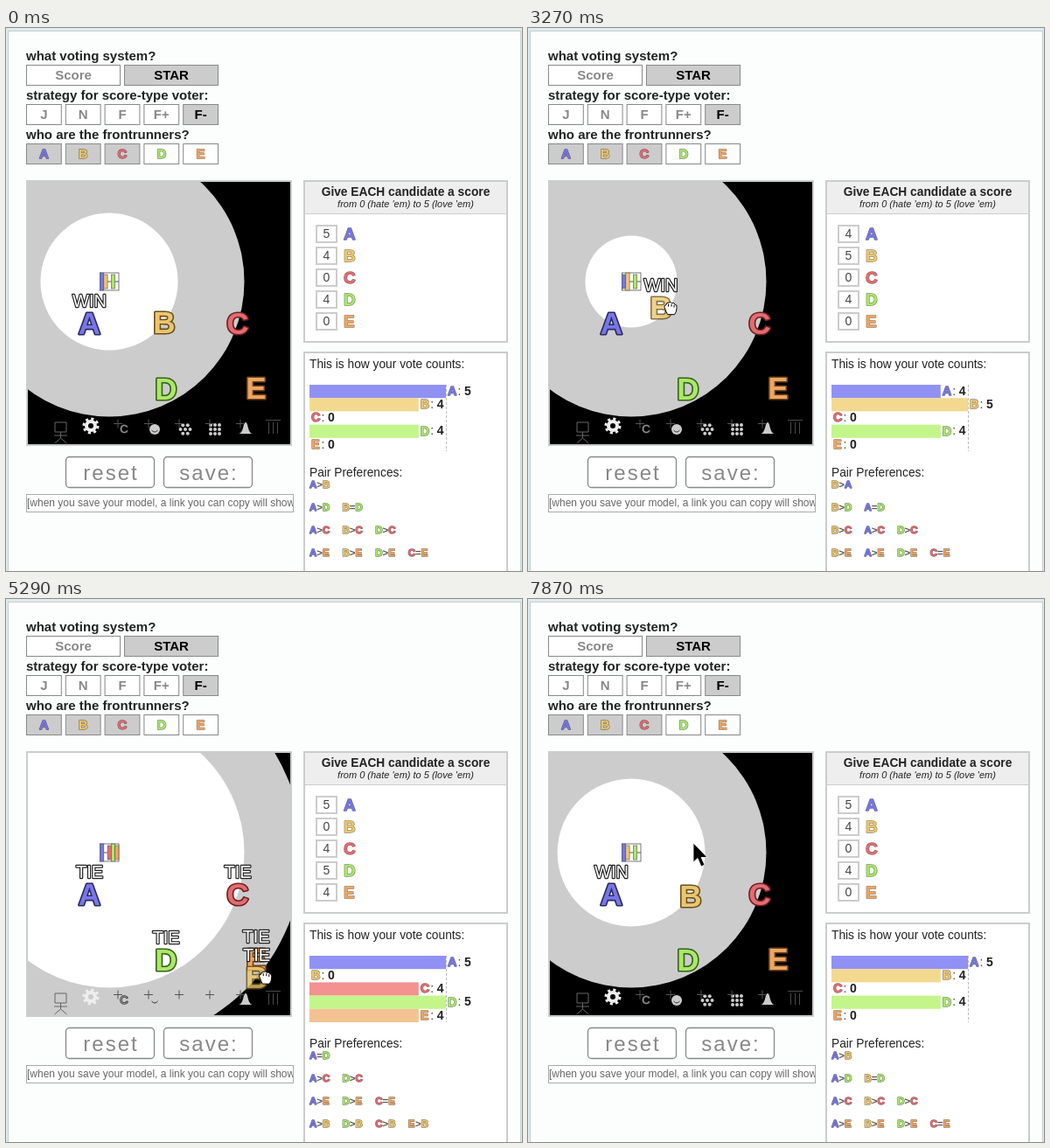
An HTML page for the animation above (7.99 s loop, 590 px wide and 621 px high).

```html
<!DOCTYPE html>
<html lang="en">
<head>
<meta charset="utf-8">
<title>Voting sandbox</title>
<style>
html, body { margin: 0; width: 100%; height: 100%; overflow: hidden; background: #dfeaec; }
svg { display: block; font-family: "Liberation Sans", Arial, sans-serif; }
</style>
</head>
<body>
<svg id="stage" width="590" height="621" viewBox="0 0 590 621"></svg>
<script>
const LOOP = 7990, STEP = 120;
const ENTER = 500, GRAB = 1760, DROP = 7100, OPEN = 7720, LEAVE = 7870;
const VOTER = { x: 118, y: 290 };
const CANDIDATES = [
  { id: 'A', x: 95.5, y: 337.5, fill: '#7676e6', dark: '#29295f', bar: '#9191f4' },
  { id: 'B', x: 181, y: 337, fill: '#ecc66e', dark: '#67501c', bar: '#f3d990' },
  { id: 'C', x: 265, y: 337.5, fill: '#e46c70', dark: '#6b2024', bar: '#f39191' },
  { id: 'D', x: 183, y: 413, fill: '#aae868', dark: '#366018', bar: '#c3f58b' },
  { id: 'E', x: 286, y: 411.5, fill: '#eda662', dark: '#6d4118', bar: '#f4c290' },
];

// Drag of B: first redraw, number of redraws, where it ends
const MOVES = [[1760, 6, 175, 330], [2480, 1, 156, 322], [2600, 2, 146, 312], [3150, 2, 152, 320],
  [3420, 4, 185, 346.5], [4550, 3, 228, 398], [4910, 4, 286.5, 433], [5410, 2, 294, 440],
  [5780, 4, 218, 381], [6260, 2, 192, 350], [6530, 1, 179, 333], [6670, 1, 177, 331], [7100, 1, 186, 340]];

const series = (start, n, gap) => Array.from({ length: n }, (_, i) => start + i * gap);
const TICKS = [0, ...series(ENTER, 9, 140), ...MOVES.flatMap(([t, n]) => series(t, n, STEP)), OPEN, LEAVE];

function dragged(t) {
  let { x, y } = CANDIDATES[1];
  for (const [start, n, toX, toY] of MOVES) {
    const k = Math.min(1, Math.max(0, (t - start + STEP) / (n * STEP)));
    x += (toX - x) * k;
    y += (toY - y) * k;
  }
  return { x, y };
}

// The arrow curves in from the lower left to B
function approach(t) {
  const s = ((t - ENTER) / (GRAB - ENTER)) ** 0.8;
  const curve = (a, b, c) => (1 - s) ** 2 * a + 2 * s * (1 - s) * b + s * s * c;
  return { x: curve(57, 390, 190), y: curve(597, 400, 336) };
}

// y is the middle of the capitals
const text = (s, x, y, size, attrs = '') =>
  `<text x="${x}" y="${y + size * 0.344}" font-size="${size}" ${attrs}>${s}</text>`;
const rect = (x, y, w, h, fill, attrs = '') =>
  `<rect x="${x}" y="${y}" width="${w}" height="${h}" fill="${fill}" ${attrs}/>`;
const disc = (x, y, r, fill) => `<circle cx="${x}" cy="${y}" r="${r}" fill="${fill}"/>`;
const path = (d, attrs) => `<path d="${d}" ${attrs}/>`;
const frame = (x, y, w, h, fill = '#fff') =>
  rect(x + 1, y + 1, w - 2, h - 2, fill, 'stroke="#ccc" stroke-width="2"');
const BOLD = 'font-weight="bold" ';
const MID = 'text-anchor="middle" ';
const INK = 'fill="#222" ';

const outline = (color, width) =>
  `stroke="${color}" stroke-width="${width}" stroke-linejoin="round" paint-order="stroke" `;
const glyph = (c, x, y, size, attrs = '') => text(c.id, x, y, size,
  `${BOLD} fill="${c.fill}" stroke-opacity=".7" ${outline(c.dark, 1.3)} ${attrs}`);

function optionRow(title, y, labels, w, chosen) {
  return text(title, 23, y, 15, BOLD + INK) + labels.map((label, i) => {
    const x = 23.5 + i * (w + 4), mid = x + w / 2 - 0.5, on = chosen.includes(i);
    return rect(x, y + 10.5, w - 1, 23, on ? '#ccc' : '#fff', 'stroke="#888"') +
      (label.id ? glyph(label, mid, y + 22, 15, MID)
        : text(label, mid, y + 22, 15, BOLD + MID + `fill="${on ? '#000' : '#888'}"`));
  }).join('');
}

function bigButton(label, x, hover) {
  return rect(x + 0.5, 490.5, 101, 35, hover ? '#eee' : '#fff', 'rx="4" stroke="#888" stroke-width="1.3"') +
    text(label, x + 52, 509, 24, MID + 'fill="#888" letter-spacing="2"');
}

function toolbar() {
  const plus = series(128, 5, 35).map(x => `M${x - 5} 452.5h10M${x} 447.5v10`).join('');
  let dots = '';
  for (let i = 0; i < 9; i++) dots += disc(234 + i % 3 * 5, 454 + Math.floor(i / 3) * 5, 2, '#ccc');
  for (let i = 0; i < 7; i++) {
    const a = i * Math.PI / 3, r = i < 6 ? 5.5 : 0;
    dots += disc(205 + r * Math.cos(a), 459 + r * Math.sin(a), 2, '#ccc');
  }
  return path('M56 451h13v11h-13zM62.5 462v7M55 466h15M62.5 469l-7 6M62.5 469l7 6', 'fill="none" stroke="#666"') +
    '<g fill="none" stroke="#eee"><circle cx="97" cy="455" r="5" stroke-width="4"/>' +
    '<circle cx="97" cy="455" r="8" stroke-width="3" stroke-dasharray="3.14"/></g>' +
    text('C', 135, 459, 13, MID + 'fill="#999"' + outline('#333', 1.5)) +
    disc(170, 459, 6, '#ccc') + path('M166.5 460q3.5 4 7 0', 'fill="none" stroke="#333"') + dots +
    path('M266 464c6-1 5-13 8-13s2 12 8 13z', 'fill="#ccc"') + path(plus, 'stroke="#555"') +
    path('M297 448.5h17M300.5 451v13M305.5 451v13M310.5 451v13', 'stroke="#4a4a4a"');
}

function ballot(c, i) {
  const w = 4.3, x = 107.5 + i * w, h = 4 * c.score;
  return h ? rect(x, VOTER.y - h / 2, w, h, c.fill, 'stroke="#555" stroke-width=".6"')
    : path(`M${x} ${VOTER.y}h${w}`, 'stroke="#555"');
}

function piece(c, label, held) {
  return text(c.id, c.x, c.y, 35,
    `${BOLD + MID} fill="${c.fill}" opacity="${held ? 0.8 : 1}" ${outline(c.dark, 3.2)}`) +
    text(label, c.x, c.y - 25.5, 20, MID + 'fill="#fff" ' + outline('#222', 2.4));
}

function cursor(t) {
  const put = (p, d, attrs) => path(d, `transform="translate(${p.x} ${p.y})" ${attrs}`);
  const arrow = p => put(p, 'M0 0V22L5 17.5L9 27L13 25L9 16.5H16Z', 'stroke="#fff" stroke-width=".8"');
  const hand = 'fill="#fff" stroke="#000" stroke-linejoin="round"';
  if (t < ENTER) return '';
  if (t < GRAB) {
    const p = approach(t), inField = p.y > 533 && p.y < 554;
    return inField ? put(p, 'M-4-11q4 0 4 3V8q0 3-4 3M4-11q-4 0-4 3V8q0 3 4 3', 'fill="none" stroke="#000"') : arrow(p);
  }
  if (t >= LEAVE) return arrow({ x: 189, y: 279 });
  // The held piece trails the hand a little
  const b = dragged(t + STEP / 2), grip = { x: b.x + 9, y: b.y - 1 };
  return put(grip, t >= OPEN
    ? 'M-4 9Q-5 5-9 1Q-9-2-5 0L-6-6Q-5-9-3-6L-2-8Q0-10 1-7Q4-9 4-5Q8-7 7-2Q8 5 5 9ZM-3-6l1 5M1-7v6M4-5v4'
    : 'M-7-1Q-8-4-5-4Q-5-7-2.5-6.5Q0-8 1.5-6Q4-7 5-4.5Q7.5-4.5 7-1Q7 4 4.5 7H-3.5Q-5 4-7-1ZM-2.5-5v3M1-5v3M4-4v3', hand);
}

function scene(t) {
  const cands = CANDIDATES.map(c => c.id === 'B' ? { ...c, ...dragged(t) } : { ...c });
  cands.forEach(c => c.dist = Math.hypot(c.x - VOTER.x, c.y - VOTER.y));
  // The second and third nearest frontrunners set the score limits
  const [, near, far] = cands.slice(0, 3).map(c => c.dist).sort((a, b) => a - b);
  cands.forEach(c => c.score = c.dist < near ? 5 : c.dist < far ? 4 : 0);
  const ranked = [...cands].sort((a, b) => b.score - a.score);
  const tie = ranked[0].score === ranked[1].score;
  const held = t >= GRAB && t < DROP;
  const pointer = approach(t);
  const onSave = t >= ENTER && t < GRAB && pointer.x > 180 && pointer.x < 282 && pointer.y > 490 && pointer.y < 526;
  const bOnTop = [...cands].sort((a, b) => (a.id === 'B') - (b.id === 'B'));

  const scores = cands.map((c, i) => {
    const y = 235.5 + i * 25;
    return frame(354, y - 10.5, 25, 21) + text(c.score, 366.5, y, 14, MID + 'fill="#444"') + glyph(c, 386, y, 19);
  }).join('');
  const bars = cands.map((c, i) => {
    const y = 408 + i * 15.2, w = c.score * 31.2, x = 347 + w;
    return rect(347, y, w, 15.2, c.bar) + glyph(c, x + 2, y + 7, 14.5) +
      text(':', x + 13.5, y + 7, 14, 'fill="#444"') + text(c.score, x + 21, y + 7, 14, BOLD + INK);
  }).join('');
  const pairs = ranked.map((low, j) => ranked.slice(0, j).map((high, i) => {
    const x = 347 + i * 37.6, y = 496 + j * 26;
    return glyph(high, x, y, 11.5) + glyph(low, x + 15, y, 11.5) +
      text(high.score > low.score ? '&gt;' : '=', x + 8.2, y, 11.5, BOLD + 'fill="#555"');
  }).join('')).join('');

  return rect(2.5, 3.5, 586, 640, '#fcfefe', 'stroke="#c3cfd0"') +
    optionRow('what voting system?', 32, ['Score', 'STAR'], 108, [1]) +
    optionRow('strategy for score-type voter:', 77, ['J', 'N', 'F', 'F+', 'F-'], 40.8, [4]) +
    optionRow('who are the frontrunners?', 122, cands, 40.8, [0, 1, 2]) +
    frame(23, 174, 304, 304, '#000') +
    '<clipPath id="view"><rect x="25" y="176" width="300" height="300"/></clipPath><g clip-path="url(#view)">' +
    disc(VOTER.x, VOTER.y, far, '#ccc') + disc(VOTER.x, VOTER.y, near, '#fff') + toolbar() +
    rect(107.5, 280, 21.5, 20, '#fff', 'stroke="#555" stroke-width=".8"') + cands.map(ballot).join('') +
    bOnTop.map(c => piece(c, tie ? 'TIE' : c === ranked[0] ? 'WIN' : '', held && c.id === 'B')).join('') + '</g>' +
    bigButton('reset', 68) + bigButton('save:', 180, onSave) +
    rect(23.5, 533.5, 305, 20, '#fff', 'stroke="#aaa"') + '<svg x="24" y="534" width="304" height="19">' +
    text('[when you save your model, a link you can copy will show', 0, 9, 12, 'fill="#666"') + '</svg>' +
    frame(340, 174, 234, 186) + rect(342, 176, 230, 36, '#eee') + rect(342, 212, 230, 1, '#ccc') +
    text('Give EACH candidate a score', 457, 187, 13.75, BOLD + MID + INK) +
    text("from 0 (hate 'em) to 5 (love 'em)", 457, 201, 11, MID + INK + 'font-style="italic"') + scores +
    frame(340, 370, 234, 270) + text('This is how your vote counts:', 347, 384, 13.75, INK) +
    path('M503.5 408V484', 'stroke="#bbb" stroke-dasharray="3 2"') + bars +
    text('Pair Preferences:', 347, 508, 13.75, INK) + pairs + cursor(t);
}

const stage = document.getElementById('stage');
let shown = -1;
function render(now) {
  const tick = Math.max(...TICKS.filter(k => k <= now % LOOP));
  if (tick !== shown) {
    shown = tick;
    stage.innerHTML = scene(tick);
  }
  requestAnimationFrame(render);
}
render(performance.now());
</script>
</body>
</html>
```
